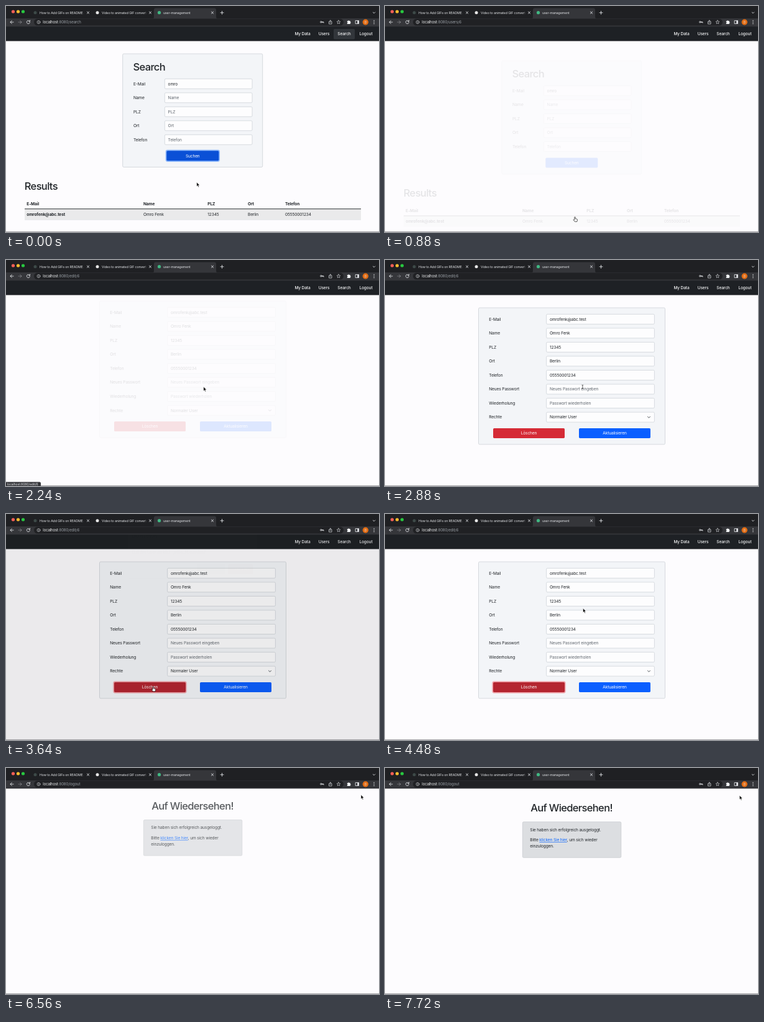
These frames come from a looping animation (600x364 px, 8000 ms). An HTML page:

```html
<!DOCTYPE html>
<html lang="de">
<head>
<meta charset="utf-8">
<title>user-management</title>
<style>
  html, body { margin: 0; width: 100%; height: 100%; overflow: hidden; background: #fdfcfe; }
  svg { display: block; width: 100%; height: 100%; }
  text { font: 6.55px Inter, "Open Sans", sans-serif; letter-spacing: -.018em; fill: #212529; white-space: pre; }
  .h1 { font-size: 16.5px; font-weight: 500; letter-spacing: -.04em; }
  .bold { font-weight: 700; }
  .mid { text-anchor: middle; }
  .hint { fill: #60676e; }
  .white { fill: #fff; }
  .nav { fill: #f4f5f6; font-weight: 500; }
  .tab { font-size: 5.2px; fill: #e4e6e9; }
  .url { font-size: 6px; fill: #9aa0a6; }
  .status { font-size: 5.1px; fill: #e8eaed; }
  .icon { fill: none; stroke: #dfe1e5; stroke-width: .9; stroke-linecap: round; stroke-linejoin: round; }
  .dim { opacity: .45; }
</style>
</head>
<body>
<svg id="stage" viewBox="0 0 600 364"></svg>
<script>
const LOOP = 8000;
const NAV = 23.5, SLIDE = 12.5, ROUTE = 300;
const user = ['omrofenk@abc.test', 'Omro Fenk', '12345', 'Berlin', '05550001234'];
const fields = ['E-Mail', 'Name', 'PLZ', 'Ort', 'Telefon'];

// Drawing helpers; y is the middle of a line of text.
const text = (x, y, s, cls = '') => `<text x="${x}" y="${y + 2.3}" class="${cls}">${s}</text>`;
const rect = (x, y, w, h, fill, extra = '') =>
  `<rect x="${x}" y="${y}" width="${w}" height="${h}" fill="${fill}" ${extra}/>`;
const circle = (x, y, r, fill) => `<circle cx="${x}" cy="${y}" r="${r}" fill="${fill}"/>`;
const icon = (d, extra = '') => `<path class="icon" d="${d}" ${extra}/>`;
const group = (id, body) => `<g id="${id}">${body}</g>`;
const card = (x, y, w, h, fill = '#f3f5f8', stroke = '#c8ccd1') =>
  rect(x, y, w, h, fill, `rx="1.7" stroke="${stroke}" stroke-width=".7"`);
const input = (x, y, w, s, cls) =>
  rect(x, y - 8, w, 16, '#fdfdfe', 'rx="1.7" stroke="#c9ced4" stroke-width=".7"') + text(x + 5.3, y, s, cls);
const button = (id, x, y, w, s, fill, ring) =>
  rect(x, y - 8, w, 16, fill, `id="${id}" rx="1.7" stroke="${ring}" stroke-width="0" paint-order="stroke"`) +
  text(x + w / 2, y, s, 'mid white');
const cross = x => icon(`M${x - 1.6} 9.1l3.2 3.2m0-3.2l-3.2 3.2`, 'stroke-width=".7"');

function browser() {
  return rect(0, 0, 600, 21, '#1f2023') +
    ['#ff5f57', '#febc2e', '#28c840'].map((c, i) => circle(11.5 + 8 * i, 9, 2.6, c)).join('') +
    '<path d="M235 20.5q3 0 3-3V6.500q0-3 3-3H335q3 0 3 3V17.500q0 3 3 3z" fill="#35363a"/>' +
    rect(0, 20, 600, 13.2, '#35363a') +
    circle(47, 10.7, 2.5, '#3d4a48') + text(54, 10.8, 'How to Add GIFs on README<tspan class="dim">.</tspan>', 'tab') +
    circle(147, 10.7, 2.5, '#e6e6e6') + text(154, 10.8, 'Video to animated GIF conver<tspan class="dim">t</tspan>', 'tab') +
    circle(246.5, 10.7, 2.6, '#41b883') + text(253, 10.8, 'user-management', 'tab') +
    cross(132) + cross(232) + cross(332) +
    icon('M347.500 8.300v5m-2.500-2.500h5M590.300 10l1.700 1.700 1.700-1.700') +
    icon('M12 26H7m2.300-2.400L6.900 26l2.400 2.400') +
    icon('M20 26h5m-2.300-2.400L25.100 26l-2.400 2.400', 'opacity=".4"') +
    icon('M38.200 24.700A2.600 2.600 0 1 0 38.500 26.500M38.500 23v2h-2') +
    rect(45, 20.600, 498, 11, '#202124', 'rx="5.500"') +
    '<circle class="icon" cx="52.500" cy="26" r="2.500" style="stroke-width:.6"/>' + icon('M52.500 26v1.200m0-2.600v.1', 'style="stroke-width:.7"') +
    '<text id="url" class="url" x="59.300" y="28.200"><tspan fill="#f1f3f4">localhost</tspan>:8080<tspan id="path"></tspan></text>' +
    '<circle class="icon" cx="506.800" cy="25.800" r="1.200"/>' + icon('M508 25.800h3v1.200m-1.200-1.200v1') +
    icon('M520.500 25h-1v4h4.500v-4h-1M521.800 27v-4m-1.200 1.200l1.200-1.200 1.200 1.200', 'style="stroke-width:.7"') +
    icon('M535 23l.9 1.900 2 .2-1.500 1.400.4 2.100-1.800-1.100-1.800 1.100.4-2.100-1.500-1.400 2-.2z', 'style="stroke-width:.6"') +
    '<path d="M548.800 24h1.400a1.100 1.100 0 0 1 2.100 0h1.500v1.600a1.100 1.100 0 0 1 0 2.100v1.300h-5v-1.500a1 1 0 0 0 0-1.900z" fill="#f1f3f4"/>' +
    icon('M562.500 23.500h5v5h-5z') + rect(565.200, 23.500, 2.300, 5, '#dfe1e5') +
    circle(578.300, 26, 4.700, '#e36c12') + text(578.300, 25.800, 'D', 'mid tab') +
    [23.500, 26, 28.500].map(y => circle(592, y, .75, '#dfe1e5')).join('');
}

function navigation() {
  const links = { 'My Data': 477, Users: 511.500, Search: 544, Logout: 579 };
  return rect(0, 33, 600, NAV, '#1e2125') +
    rect(527, 37, 34, 16.500, '#32363b', 'id="activeLink" rx="1.7"') +
    Object.entries(links).map(([s, x]) => text(x, 45, s, 'mid nav')).join('');
}

function searchPage() {
  const columns = [33.300, 221, 324.300, 389, 449];
  const rowY = i => 125.300 + 22.500 * i;
  return card(187.700, 77, 225, 182.500) + `<text x="204.500" y="103.500" class="h1">Search</text>` +
    fields.map((s, i) => text(205, rowY(i), s) +
      input(255.300, rowY(i), 140.700, i ? s : 'omro', i ? 'hint' : '')).join('') +
    button('find', 258.300, 241.300, 84, 'Suchen', '#0b5fff', '#8fb9fb') +
    `<text x="29.800" y="296" class="h1">Results</text>` +
    rect(30, 327, 541, 17, '#eaeaeb') + rect(30, 326.300, 541, 1, '#2b2f33') + rect(30, 344, 541, .5, '#d3d6da') +
    columns.map((x, i) => text(x, 318.300, fields[i], 'bold') + text(x, 335.800, user[i], i ? '' : 'bold')).join('');
}

function detailsPage() {
  return card(187.700, 77, 225, 147) +
    fields.map((s, i) => text(205, 95.300 + 22.500 * i, s, 'bold') + text(260, 95.300 + 22.500 * i, user[i])).join('') +
    button('modify', 258.300, 208, 84, 'Bearbeiten', '#0b5fff', '#8fb9fb');
}

function editPage() {
  const rows = [...fields, 'Neues Passwort', 'Wiederholung', 'Rechte'];
  const values = [...user, 'Neues Passwort eingeben', 'Passwort wiederholen', 'Normaler User'];
  return card(150.500, 77, 300, 220) +
    rows.map((s, i) => {
      const y = 95.300 + 22.550 * i;
      return text(167.300, y, s) + input(259.600, y, 173.800, values[i], i == 5 || i == 6 ? 'hint' : '');
    }).join('') +
    icon('M422.500 252.200l2 2 2-2', 'style="stroke:#343a40"') +
    button('remove', 174, 279, 115, 'Löschen', '#d52b36', '#f0a3a9') +
    button('save', 312, 279, 115, 'Aktualisieren', '#0b5fff', '#8fb9fb');
}

function byePage() {
  return '<text x="300" y="69.800" class="h1 mid">Auf Wiedersehen!</text>' +
    card(221.300, 86.800, 158.500, 57.500, '#dcdee1', '#c6c9cd') +
    text(233.300, 99.300, 'Sie haben sich erfolgreich ausgeloggt.') +
    text(233.300, 115.800, 'Bitte <tspan fill="#0b66fd" text-decoration="underline">klicken Sie hier</tspan>, um sich wieder') +
    text(233.300, 126, 'einzuloggen.');
}

function dialogBox() {
  return card(196, 45, 208, 80, '#fff', '#888') +
    text(203, 58, 'User löschen', 'bold') + text(203, 83, 'Soll der User wirklich gelöscht werden?') +
    rect(196, 71, 208, .5, '#dee2e6') + rect(196, 95, 208, .5, '#dee2e6') +
    button('cancel', 307, 110, 46, 'Abbrechen', '#6c757d', '#bbb') +
    button('confirm', 357, 110, 40, 'Löschen', '#d52b36', '#f0a3a9');
}

const pointers = {
  arrow: '<path d="M0 0v6.600l1.500-1.400 1.100 2.500 1.100-.5-1.100-2.400h2.100z" fill="#000" stroke="#fff" stroke-width=".5"/>',
  hand: '<path d="M0 .6q.7-1 1.400 0v2.500l2.800.7q.7.300.5 1.200l-.7 2.800H.5L-1.700 5q.1-1 1.700-.3z" fill="#fff" stroke="#000" stroke-width=".65"/>',
  beam: '<path d="M-1.300-3q1.300 0 1.300 1v4q0 1-1.300 1M1.300-3q-1.300 0-1.300 1M0 2q0 1 1.300 1" fill="none" stroke="#222" stroke-width=".7"/>'
};

document.getElementById('stage').innerHTML =
  rect(0, 0, 600, 364, '#fdfcfe') +
  group('search', searchPage()) + group('details', detailsPage()) + group('edit', editPage()) + group('bye', byePage()) +
  group('nav', navigation()) +
  rect(0, 33, 600, 331, '#000', 'id="shade"') + group('dialog', dialogBox()) +
  rect(0, 363.400, 600, .6, '#6b6b6e') +
  group('status', '<path d="M0 357.500h54q2 0 2 2V364H0z" fill="#35363a"/>' +
    '<text class="status" x="1.800" y="362.800">localhost:8080<tspan id="target"></tspan></text>') +
  browser() +
  Object.entries(pointers).map(([id, d]) => group(id, d)).join('');

const $ = id => document.getElementById(id);
const set = (id, attrs) => { for (const k in attrs) $(id).setAttribute(k, attrs[k]); };
const ramp = (t, start, length) => Math.min(1, Math.max(0, (t - start) / length));
const pulse = (t, on, off, length) => ramp(t, on, length) - ramp(t, off, length);
const smooth = p => p * p * (3 - 2 * p);
const easeIn = p => p ** 1.7;
const stepAt = (t, list) => list.filter(s => s[0] <= t).pop();

const routes = [[0, '/search'], [600, '/users/6'], [1910, '/edit/6'], [6090, '/logout']];
// Each entry: time, x, y of the pointer tip.
const trail = [[0, 306.800, 284], [100, 306.800, 284], [480, 304.800, 339.500], [980, 304.800, 339.500],
  [1640, 317.800, 204.300], [3000, 317.800, 204.300], [3460, 236, 278], [3740, 236, 278], [4030, 328, 110],
  [4170, 328, 110], [4440, 318.600, 152], [5140, 318.600, 152], [5940, 572, 42.700], [6300, 571.500, 42.700],
  [6900, 570.300, 44.200], [LOOP, 570.300, 44.200]];
const shapes = [[0, 'arrow'], [400, 'hand'], [920, 'arrow'], [1600, 'hand'], [2215, 'arrow'], [2300, 'beam'],
  [3060, 'arrow'], [3410, 'hand'], [3660, 'arrow'], [3990, 'hand'], [4200, 'arrow'], [5900, 'hand'], [6100, 'arrow']];

function showPage(id, t, enter, leave, lift = 0) {
  const coming = 1 - easeIn(1 - ramp(t, enter, ROUTE));
  const going = easeIn(ramp(t, leave, ROUTE));
  set(id, {
    opacity: coming * (1 - going),
    transform: `translate(0 ${SLIDE * (going - (1 - coming)) - lift})`
  });
}

function movePointer(t) {
  const i = trail.findIndex(p => p[0] > t);
  const [t0, x0, y0] = trail[i - 1], [t1, x1, y1] = trail[i];
  const p = smooth((t - t0) / (t1 - t0));
  const shape = stepAt(t, shapes)[1];
  for (const id in pointers) set(id, {
    visibility: id == shape ? 'visible' : 'hidden',
    transform: `translate(${x0 + (x1 - x0) * p} ${y0 + (y1 - y0) * p})`
  });
}

function draw(t) {
  const loggedOut = t >= 6090;
  showPage('search', t, -ROUTE, 600);
  showPage('details', t, 905, 1910);
  showPage('edit', t, 2218, 6090, loggedOut ? NAV : 0);
  showPage('bye', t, 6395, LOOP);

  $('path').textContent = stepAt(t, routes)[1];
  set('nav', { visibility: loggedOut ? 'hidden' : 'visible' });
  set('activeLink', { opacity: t < 600 ? 1 : 0 });

  set('find', { fill: t < 600 ? '#0a50d6' : '#0b5fff', 'stroke-width': t < 600 ? 3.400 : 0 });
  const focused = t >= 3620 && !loggedOut;
  set('remove', { fill: t >= 3410 && !loggedOut ? '#b42530' : '#d52b36', 'stroke-width': focused ? 3.400 : 0 });

  set('shade', { opacity: .5 * pulse(t, 3620, 4290, 150) });
  const open = pulse(t, 3640, 4140, 300);
  set('dialog', { opacity: open, transform: `translate(0 ${-21 * (1 - smooth(open))})` });

  $('target').textContent = t < 4000 ? '/edit/6' : '/logout';
  set('status', { opacity: pulse(t, 1720, 2560, 150) + pulse(t, 5970, 6090, 90) });
  movePointer(t);
}

function tick(now) {
  draw(now % LOOP);
  requestAnimationFrame(tick);
}
draw(0);
requestAnimationFrame(tick);
</script>
</body>
</html>
```
